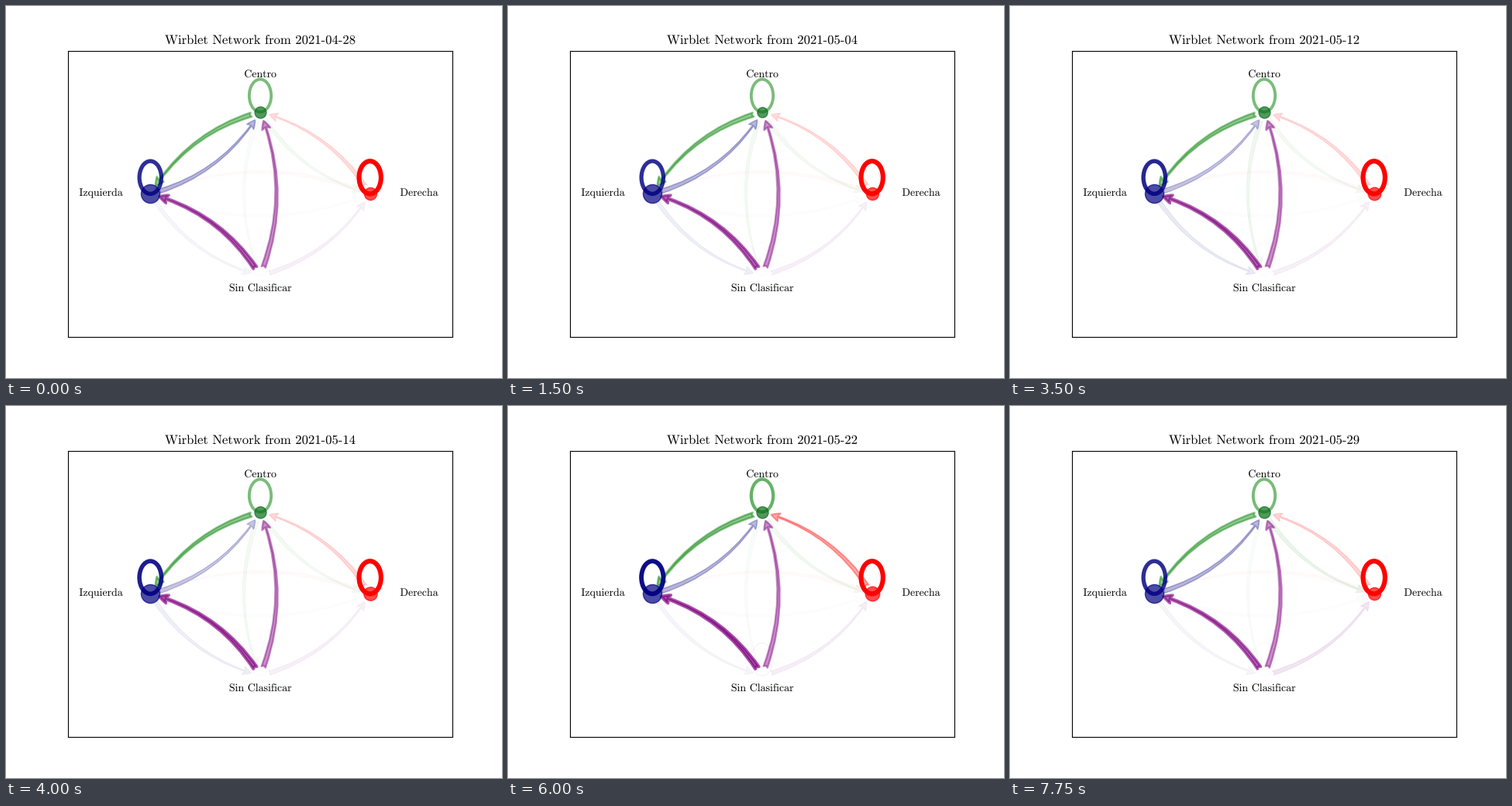
A matplotlib script that plays this animation: 640 by 480 pixels, repeating every 8000 ms.

```python
import math

import matplotlib.pyplot as plt
from matplotlib.animation import FuncAnimation
from matplotlib.patches import Ellipse, FancyArrowPatch, PathPatch
from matplotlib.path import Path
from matplotlib.textpath import TextPath
from matplotlib.transforms import Affine2D

plt.rcParams["mathtext.fontset"] = "cm"

DAYS = 32
EM = 12 * 100 / 72        # title size in pixels
LABEL_EM = 10 * 100 / 72

POS = {"I": (-1, 0), "C": (0, 1), "D": (1, 0), "S": (0, -1)}
COLOR = {"I": "navy", "C": "green", "D": "red", "S": "purple"}

# Each value follows base + bump * bell(day around peak): (base, bump, peak)
LINKS = {
    "ID": (0.008, 0, 0),
    "DI": (0.018, 0, 0),
    "CS": (0.025, 0.05, 11),
    "IS": (0.04, 0.06, 11),
    "CD": (0.045, 0.035, 31),
    "SD": (0.06, 0.04, 31),
    "DC": (0.14, 0.2, 24),
    "IC": (0.28, -0.06, 16),
    "CI": (0.43, 0.04, 21),
    "SC": (0.43, 0, 0),
    "SI": (0.6, 0.12, 21),
    "SS": (0.015, 0.03, 24),
    "CC": (0.52, 0.08, 24),
    "II": (0.82, 0.18, 21),
    "DD": (1, 0, 0),
}
# Node diameters in pixels, by the same rule
NODES = {"I": (25.4, 0, 0), "C": (16.5, -2, 7), "D": (17.5, 3.5, 21)}
NODE_COLOR = {**COLOR, "C": "#086c18"}


def level(day, base, bump, peak):
    return base + bump * math.exp(-((day - peak) / 5) ** 2)


fig, ax = plt.subplots(figsize=(6.4, 4.8), dpi=100)
ax.set(xlim=(-1.75, 1.75), ylim=(-1.75, 1.75), xticks=[], yticks=[])
pixels = Affine2D().scale(1 / 100) + fig.dpi_scale_trans


def roman(text, x, y, size):
    """Outline of text with its origin at pixel (x, y), y counted from the top."""
    body = text.replace(" ", r"\hspace{0.3794}")
    return TextPath((x, 480 - y), rf"$\mathrm{{{body}}}$", size=size)


def add_text(path):
    patch = PathPatch(path, fc="black", lw=0, transform=pixels)
    fig.add_artist(patch)
    return patch


def place(text, x, y, size, anchor):
    """Put text so that the given fraction of its ink width falls on x."""
    path = roman(text, 0, y, size)
    box = path.get_extents()
    shift = x - box.x0 - anchor * box.width
    add_text(path.transformed(Affine2D().translate(shift, 0)))


def hyphen(x, y):
    box = Affine2D().scale(0.265 * EM, 0.058 * EM)
    box.translate(x + 0.011 * EM, 480 - y + 0.187 * EM)
    return Path.unit_rectangle().transformed(box)


def date_path(day):
    month, dom = (4, 28 + day) if day < 3 else (5, day - 2)
    x, y = 373.3, 49
    digits = roman(f"2021 {month:02d} {dom:02d}", x, y, EM)
    return Path.make_compound_path(
        digits, hyphen(x + 2 * EM, y), hyphen(x + 10 / 3 * EM, y))


def make_link(a, b):
    if a == b:
        x, y = POS[a]
        patch = Ellipse((x, y + 0.2), 0.2, 0.4, fill=False, ec=COLOR[a])
    else:
        patch = FancyArrowPatch(
            POS[a], POS[b], color=COLOR[a], mutation_scale=10,
            arrowstyle="fancy,head_length=0.8,head_width=0.8,tail_width=0.4",
            connectionstyle="arc3,rad=0.2", shrinkA=8.66, shrinkB=8.66)
    patch.set_zorder(1)
    return ax.add_patch(patch)


links = {key: make_link(*key) for key in LINKS}
nodes = {key: ax.scatter(*POS[key], color=NODE_COLOR[key], alpha=0.7,
                         linewidths=1, zorder=2) for key in NODES}

place("Wirblet Network from", 367.5, 49, EM, 1)
date = add_text(date_path(0))
place("Centro", 328.3, 92, LABEL_EM, 0.5)
place("Izquierda", 122.7, 245, LABEL_EM, 0.5)
place("Derecha", 533.2, 245, LABEL_EM, 0.5)
place("Sin Clasificar", 328.4, 368, LABEL_EM, 0.5)


def update(day):
    for (a, b), patch in links.items():
        w = level(day, *LINKS[a + b])
        patch.set_alpha(w)
        patch.set_linewidth(1 + 3.4 * w if a == b else max(4 * w, 0.6))
    for key, dot in nodes.items():
        d = level(day, *NODES[key])
        dot.set_sizes([((d - 1.39) * 0.72) ** 2])
    date.set_path(date_path(day))
    return [*links.values(), *nodes.values(), date]


anim = FuncAnimation(fig, update, frames=DAYS, interval=250,
                     repeat=True, repeat_delay=0, blit=False)
plt.show()
```
